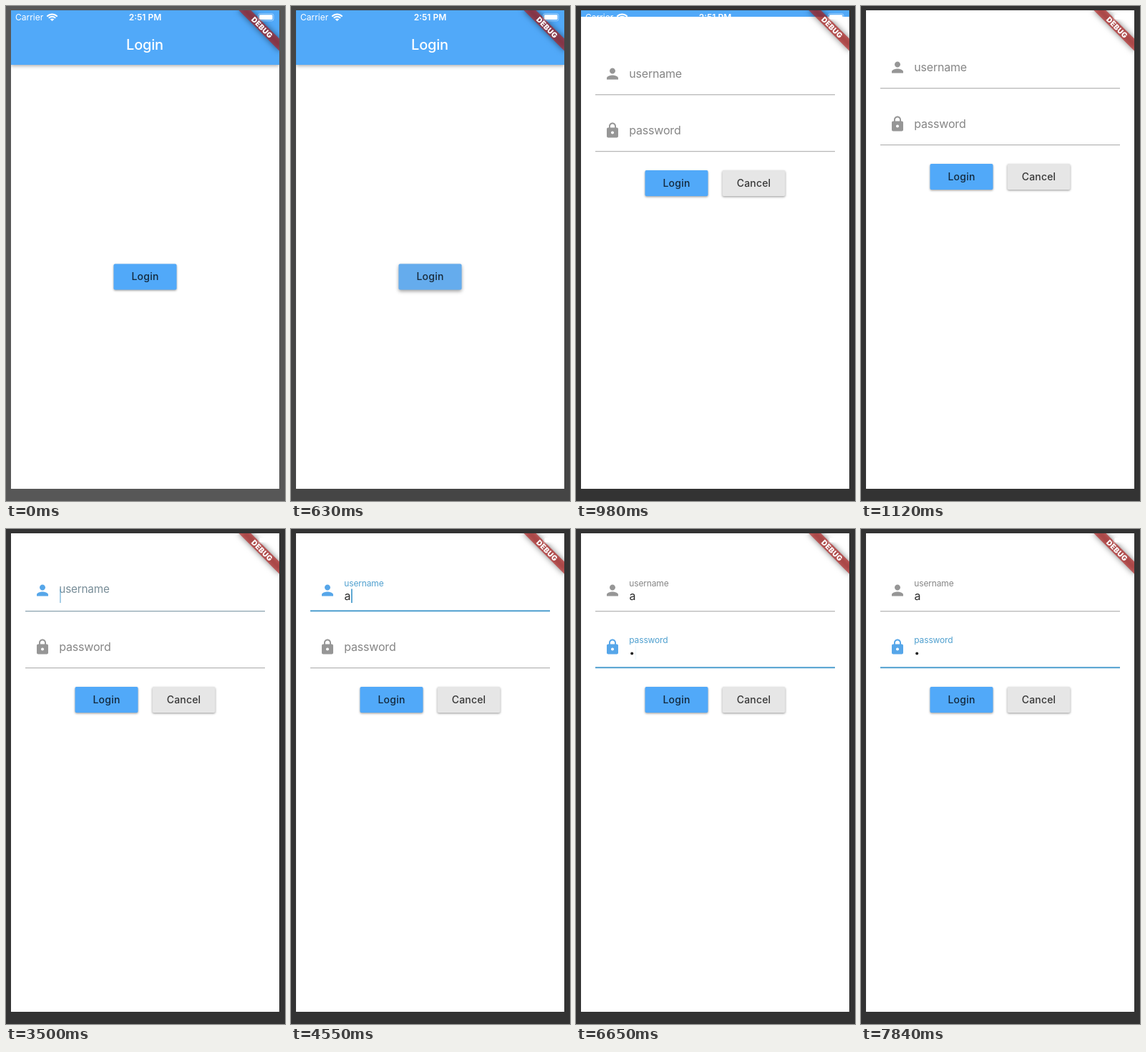
Write an HTML page with a canvas that moves like this. It is 390x690 px and loops after 8000 ms.

```html
<!DOCTYPE html>
<html lang="en">
<head>
<meta charset="utf-8">
<title>Login form</title>
<style>
  html, body { margin: 0; width: 100%; height: 100%; overflow: hidden; background: #333; }
  canvas { display: block; width: 390px; height: 690px; }
</style>
</head>
<body>
<canvas id="stage"></canvas>
<script>
const W = 390, H = 690, LOOP = 8000;
const SCREEN = { x: 7, y: 6, w: 375, h: 667 };
const BLUE = '#51a9f9';
const GREY = [150, 150, 150], LABEL = [134, 134, 134], RULE = [165, 165, 165];
const FOCUS = [80, 160, 207], FOCUS_ICON = [86, 166, 233];
const PERSON = new Path2D('M12 12c2.21 0 4-1.79 4-4s-1.79-4-4-4-4 1.79-4 4 1.79 4 4 4zm0 2c-2.67 0-8 1.34-8 4v2h16v-2c0-2.66-5.33-4-8-4z');
const LOCK = new Path2D('M18 8h-1V6c0-2.76-2.24-5-5-5S7 3.24 7 6v2H6c-1.1 0-2 .9-2 2v10c0 1.1.9 2 2 2h12c1.1 0 2-.9 2-2V10c0-1.1-.9-2-2-2zm-6 9c-1.1 0-2-.9-2-2s.9-2 2-2 2 .9 2 2-.9 2-2 2zm3.1-9H8.9V6c0-1.71 1.39-3.1 3.1-3.1s3.1 1.39 3.1 3.1v2z');

// Times in ms
const PRESS = 560, OPEN = 734, OPEN_MS = 314;
const USER_FOCUS = 3456, USER_TYPE = 4460, PASS_FOCUS = 5380, PASS_TYPE = 5805;

const canvas = document.getElementById('stage');
const dpr = window.devicePixelRatio || 1;
canvas.width = W * dpr;
canvas.height = H * dpr;
const ctx = canvas.getContext('2d');

const clamp = v => Math.max(0, Math.min(1, v));
const lerp = (a, b, p) => a + (b - a) * p;
const mix = (a, b, p) => `rgb(${a.map((v, i) => Math.round(lerp(v, b[i], p))).join(',')})`;

function bezier(x1, y1, x2, y2) {
  const at = (a, b, s) => 3 * a * s * (1 - s) ** 2 + 3 * b * s * s * (1 - s) + s ** 3;
  return x => {
    if (x <= 0) return 0;
    if (x >= 1) return 1;
    let lo = 0, hi = 1;
    for (let i = 0; i < 24; i++) {
      const mid = (lo + hi) / 2;
      if (at(x1, x2, mid) < x) lo = mid; else hi = mid;
    }
    return at(y1, y2, lo);
  };
}
const slideEase = bezier(.35, .91, .33, .97);
const labelEase = bezier(.4, 0, .2, 1);
const easeOut = bezier(0, 0, .58, 1);

function rect(x, y, w, h, color) {
  ctx.fillStyle = color;
  ctx.fillRect(x, y, w, h);
}

function roundRect(x, y, w, h, r, color) {
  ctx.fillStyle = color;
  ctx.beginPath();
  ctx.roundRect(x, y, w, h, r);
  ctx.fill();
}

function shadow(color, blur, dy) {
  ctx.shadowColor = color;
  ctx.shadowBlur = blur * dpr;
  ctx.shadowOffsetY = dy * dpr;
}

function text(str, x, y, { size, weight = 400, color, align = 'left', track = 0 }) {
  ctx.font = `${weight} ${size}px Inter, "Open Sans", sans-serif`;
  ctx.letterSpacing = `${track}px`;
  ctx.textAlign = align;
  ctx.fillStyle = color;
  ctx.fillText(str, x, y);
}

function button(str, x, y, color, pressed = 0) {
  ctx.save();
  shadow('rgba(0,0,0,.38)', 3 + 5 * pressed, 1.3 + 2 * pressed);
  roundRect(x, y, 88, 36, 2, color);
  ctx.restore();
  if (pressed) roundRect(x, y, 88, 36, 2, `rgba(188,188,188,${.4 * pressed})`);
  text(str, x + 44, y + 22.8, { size: 14, weight: 500, color: 'rgba(0,0,0,.76)', align: 'center', track: .2 });
}

function wifi(x, y) {
  ctx.save();
  ctx.beginPath();
  ctx.moveTo(x, y);
  ctx.arc(x, y, 12, -Math.PI * .77, -Math.PI * .23);
  ctx.clip();
  ctx.strokeStyle = ctx.fillStyle = '#fff';
  ctx.lineWidth = 2;
  for (const r of [9.6, 6.2]) {
    ctx.beginPath();
    ctx.arc(x, y, r, Math.PI, 0);
    ctx.stroke();
  }
  ctx.beginPath();
  ctx.arc(x, y, 3.6, 0, 7);
  ctx.fill();
  ctx.restore();
}

function battery() {
  ctx.strokeStyle = 'rgba(255,255,255,.45)';
  ctx.lineWidth = 1;
  ctx.beginPath();
  ctx.roundRect(352.5, 10.8, 21.5, 9.8, 2.5);
  ctx.stroke();
  roundRect(354, 12.3, 18.5, 6.8, 1.3, '#fff');
}

function homePage(t) {
  rect(SCREEN.x, SCREEN.y, SCREEN.w, SCREEN.h, '#fff');
  button('Login', 150.5, 359.5, BLUE, clamp((t - PRESS) / 150));
  ctx.save();
  shadow('rgba(0,0,0,.35)', 5, 1.5);
  rect(SCREEN.x, SCREEN.y, SCREEN.w, 76, BLUE);
  ctx.restore();
  text('Login', 194, 61, { size: 20, weight: 500, color: '#fff', align: 'center', track: -.2 });
  text('Carrier', 13, 20.4, { size: 12, color: '#fff' });
  wifi(64.5, 21);
  text('2:51 PM', 194.5, 20.4, { size: 12, weight: 600, color: '#fff', align: 'center' });
}

function cursorAlpha(dt) {
  const phase = dt - 650;
  if (phase < 0) return 1;
  const fade = easeOut(clamp((phase % 500) / 250));
  return Math.floor(phase / 500) % 2 ? fade : 1 - fade;
}

// y is the top of the icon box
function field(f, y, t) {
  const active = t >= f.focus && t < f.blur;
  const typed = t >= f.type;
  const float = labelEase((t - f.focus) / 200);
  const glow = float * (1 - labelEase((t - f.blur) / 200));
  const tint = t < f.blur ? glow : glow * .4;

  ctx.save();
  ctx.translate(39, y);
  ctx.fillStyle = mix(GREY, FOCUS_ICON, active ? 1 : 0);
  ctx.fill(f.icon);
  ctx.restore();

  const size = lerp(16, 12, float);
  text(f.label, 74.3, y + lerp(17.2, 6, float), {
    size, color: mix(LABEL, FOCUS, clamp(tint * 1.4)), track: -.0125 * size
  });

  const line = clamp(tint * 1.6);
  rect(27, y + lerp(40.7, 39.7, line), 335, lerp(1, 2, line), mix(RULE, FOCUS, line));

  if (typed) f.value(y);
  if (active) {
    const dt = t - (typed ? f.type : f.focus);
    ctx.globalAlpha = cursorAlpha(dt) * clamp((t - f.focus) / 80);
    rect(typed ? f.caret : 75, y + 10, 1.8, 19.5, mix(FOCUS, FOCUS, 0));
    ctx.globalAlpha = 1;
  }
}

const username = {
  label: 'username', icon: PERSON, focus: USER_FOCUS, type: USER_TYPE, blur: PASS_FOCUS, caret: 84,
  value: y => text('a', 74.5, y + 25.6, { size: 16, color: '#2c2c2c' })
};
const password = {
  label: 'password', icon: LOCK, focus: PASS_FOCUS, type: PASS_TYPE, blur: Infinity, caret: 82.5,
  value: y => {
    ctx.fillStyle = '#222';
    ctx.beginPath();
    ctx.arc(78.2, y + 21, 2, 0, 7);
    ctx.fill();
  }
};

function formPage(t) {
  if (t < OPEN) return;
  const dy = SCREEN.h * (1 - slideEase((t - OPEN) / OPEN_MS));
  ctx.save();
  ctx.translate(0, dy);
  rect(SCREEN.x, SCREEN.y, SCREEN.w, SCREEN.h, '#fff');
  field(username, 73.5, t);
  field(password, 152.5, t);
  button('Login', 96.5, 220, BLUE);
  button('Cancel', 204.5, 220, '#e6e6e6');
  ctx.restore();
}

function debugBanner() {
  const far = 1000;
  ctx.save();
  ctx.translate(SCREEN.x + SCREEN.w, SCREEN.y);
  ctx.save();
  ctx.translate(-far, 0);
  ctx.rotate(Math.PI / 4);
  shadow('rgba(0,0,0,.5)', 8, 0);
  ctx.shadowOffsetX = far * dpr;
  rect(-40, 28, 80, 12, '#000');
  ctx.restore();
  ctx.rotate(Math.PI / 4);
  rect(-40, 28, 80, 12, 'rgba(183,28,28,.627)');
  text('DEBUG', 0, 37.7, { size: 10.2, weight: 900, color: '#fff', align: 'center', track: .3 });
  ctx.restore();
}

function draw(t) {
  ctx.setTransform(dpr, 0, 0, dpr, 0, 0);
  rect(0, 0, W, H, mix([87, 87, 87], [51, 51, 51], clamp((t - PRESS) / 140)));
  ctx.save();
  ctx.beginPath();
  ctx.rect(SCREEN.x, SCREEN.y, SCREEN.w, SCREEN.h);
  ctx.clip();
  homePage(t);
  formPage(t);
  debugBanner();
  battery();
  ctx.restore();
}

const start = performance.now();
function tick() {
  draw((performance.now() - start) % LOOP);
  requestAnimationFrame(tick);
}
tick();
</script>
</body>
</html>
```
